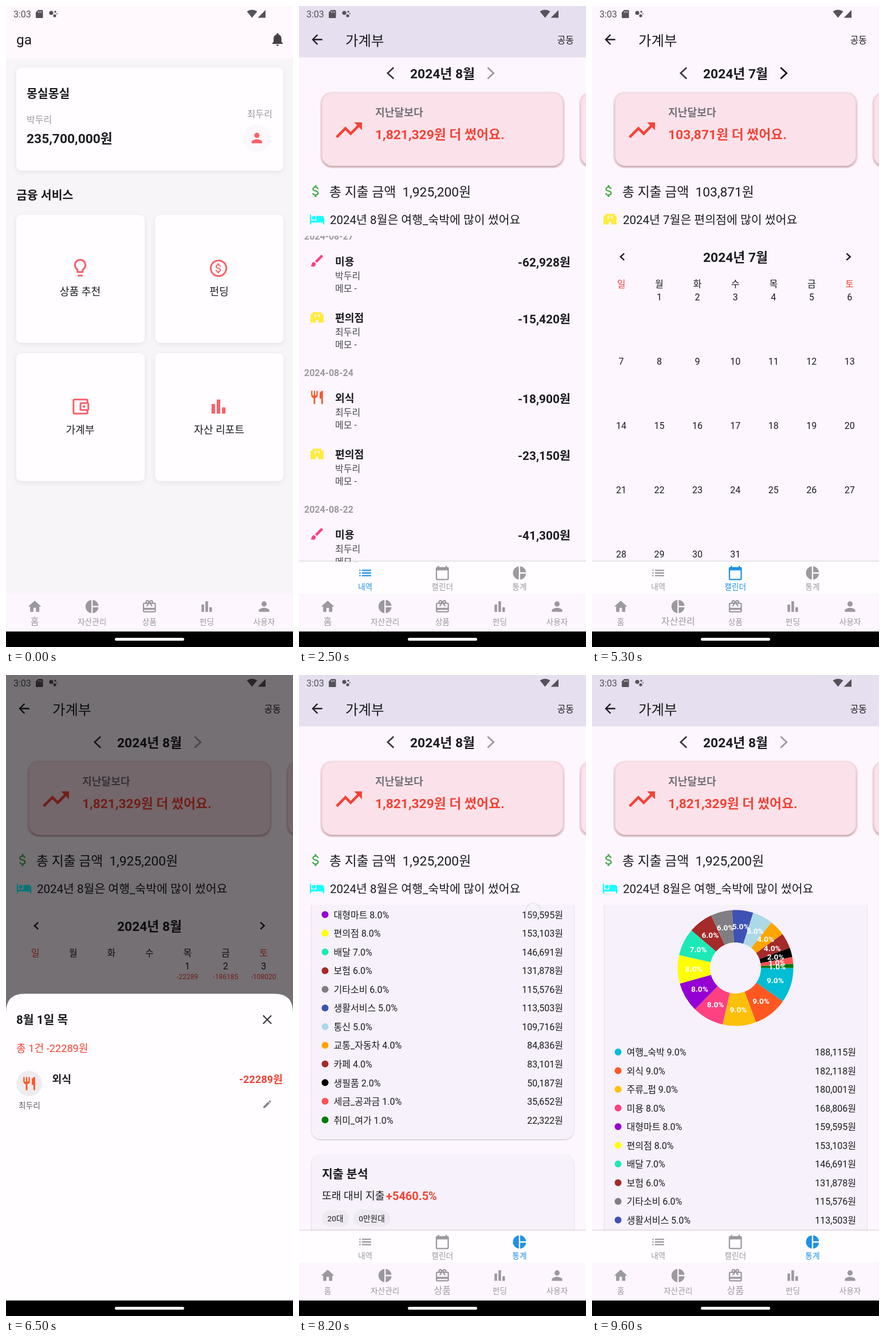
These frames come from a looping animation (501 by 1117 pixels, 9.7 s). An HTML page:

```html
<!DOCTYPE html>
<html lang="ko">
<head>
<meta charset="utf-8">
<title>가계부</title>
<style>
html, body { margin: 0; width: 100%; height: 100%; overflow: hidden; background: #000; }
svg { display: block; width: 501px; height: 1117px; }
text { font-family: Roboto, 'Noto Sans CJK KR', 'Noto Sans CJK', 'Noto Sans', sans-serif; white-space: pre; }
</style>
</head>
<body>
<svg id="stage" viewBox="0 0 501 1117" xmlns="http://www.w3.org/2000/svg"></svg>
<script>
const LOOP = 9700, STEP = 100;
const INK = '#1c1b1f', GREY = '#9c999e', RED = '#f44336', PINK = '#f9616b', BLUE = '#2191e5', SURFACE = '#fdf6fe';
const ANA = '박두리', BEA = '최두리', TEAM = '몽실몽실';

const ICONS = {
  home: 'M10 20v-6h4v6h5v-8h3L12 3 2 12h3v8z',
  pie: 'M11 2v20c-5.07-.5-9-4.79-9-10s3.93-9.5 9-10zm2.03 0v8.99H22c-.47-4.74-4.24-8.52-8.97-8.99zm0 11.01V22c4.74-.47 8.5-4.25 8.97-8.99z',
  gift: 'M20 6h-2.18c.11-.31.18-.65.18-1 0-1.66-1.34-3-3-3-1.05 0-1.96.54-2.5 1.35l-.5.67-.5-.68C10.96 2.54 10.05 2 9 2 7.34 2 6 3.34 6 5c0 .35.07.69.18 1H4c-1.11 0-2 .89-2 2v11c0 1.11.89 2 2 2h16c1.11 0 2-.89 2-2V8c0-1.11-.89-2-2-2zm-5-2a1 1 0 0 1 0 2 1 1 0 0 1 0-2zM9 4a1 1 0 0 1 0 2 1 1 0 0 1 0-2zm11 15H4v-2h16zm0-5H4V8h5.08L7 10.83 8.62 12 12 7.4l3.38 4.6L17 10.83 14.92 8H20z',
  bars: 'M4 9h4v11H4zM10 4h4v16h-4zM16 13h4v7h-4z',
  person: 'M12 12a4 4 0 1 0 0-8 4 4 0 0 0 0 8zm0 2c-2.67 0-8 1.34-8 4v2h16v-2c0-2.66-5.33-4-8-4z',
  bulb: 'M9 21c0 .55.45 1 1 1h4c.55 0 1-.45 1-1v-1H9zm3-19a7 7 0 0 0-4 12.74V17c0 .55.45 1 1 1h6c.55 0 1-.45 1-1v-2.26A7 7 0 0 0 12 2zm2.85 11.1l-.85.6V16h-4v-2.3l-.85-.6A5 5 0 1 1 14.85 13.1z',
  dollar: 'M11.8 10.9c-2.27-.59-3-1.2-3-2.15 0-1.09 1.01-1.85 2.7-1.85 1.78 0 2.44.85 2.5 2.1h2.21c-.07-1.72-1.12-3.3-3.21-3.81V3h-3v2.16c-1.94.42-3.5 1.68-3.5 3.61 0 2.31 1.91 3.46 4.7 4.13 2.5.6 3 1.48 3 2.41 0 .69-.49 1.79-2.7 1.79-2.06 0-2.87-.92-2.98-2.1h-2.2c.12 2.19 1.76 3.42 3.68 3.83V21h3v-2.15c1.95-.37 3.5-1.5 3.5-3.55 0-2.84-2.43-3.81-4.7-4.4z',
  wallet: 'M21 7.28V5a2 2 0 0 0-2-2H5a2 2 0 0 0-2 2v14c0 1.1.9 2 2 2h14a2 2 0 0 0 2-2v-2.28A2 2 0 0 0 22 15V9a2 2 0 0 0-1-1.72zM20 9v6h-7V9zM5 19V5h14v2h-6a2 2 0 0 0-2 2v6c0 1.1.9 2 2 2h6v2zm11-8.5a1.5 1.5 0 0 1 0 3 1.5 1.5 0 0 1 0-3z',
  bell: 'M12 22a2 2 0 0 0 2-2h-4c0 1.1.9 2 2 2zm6-6v-5c0-3.07-1.64-5.64-4.5-6.32V4a1.5 1.5 0 0 0-3 0v.68C7.63 5.36 6 7.92 6 11v5l-2 2v1h16v-1z',
  back: 'M20 11H7.83l5.59-5.59L12 4l-8 8 8 8 1.41-1.41L7.83 13H20z',
  rise: 'M16 6l2.29 2.29-4.88 4.88-4-4L2 16.59 3.41 18l6-6 4 4 6.3-6.29L22 12V6z',
  hotel: 'M7 13a3 3 0 1 0 0-6 3 3 0 0 0 0 6zm12-6h-8v7H3V5H1v15h2v-3h18v3h2v-9a4 4 0 0 0-4-4z',
  food: 'M11 9H9V2H7v7H5V2H3v7c0 2.12 1.66 3.84 3.75 3.97V22h2.5v-9.03C11.34 12.84 13 11.12 13 9V2h-2zm5-3v8h2.5v8H21V2c-2.76 0-5 2.24-5 4z',
  car: 'M18.92 6.01C18.72 5.42 18.16 5 17.5 5h-11c-.66 0-1.21.42-1.42 1.01L3 12v8c0 .55.45 1 1 1h1c.55 0 1-.45 1-1v-1h12v1c0 .55.45 1 1 1h1c.55 0 1-.45 1-1v-8zM6.5 16a1.5 1.5 0 0 1 0-3 1.5 1.5 0 0 1 0 3zm11 0a1.5 1.5 0 0 1 0-3 1.5 1.5 0 0 1 0 3zM5 11l1.5-4.5h11L19 11z',
  brush: 'M7 14c-1.66 0-3 1.34-3 3 0 1.31-1.16 2-2 2 .92 1.22 2.49 2 4 2 2.21 0 4-1.79 4-4 0-1.66-1.34-3-3-3zm13.71-9.37l-1.34-1.34a1 1 0 0 0-1.41 0L9 12.25 11.75 15l8.96-8.96a1 1 0 0 0 0-1.41z',
  store: 'M19 7V4H5v3H2v13h8v-4h4v4h8V7zm-8 3H9v1h2v1H8V9h2V8H8V7h3zm5 2h-1v-2h-2V7h1v2h1V7h1z',
  list: 'M3 13h2v-2H3zm0 4h2v-2H3zm0-8h2V7H3zm4 4h14v-2H7zm0 4h14v-2H7zM7 7v2h14V7z',
  calendar: 'M20 3h-1V1h-2v2H7V1H5v2H4a2 2 0 0 0-2 2v16c0 1.1.9 2 2 2h16a2 2 0 0 0 2-2V5a2 2 0 0 0-2-2zm0 18H4V8h16z',
  warning: 'M1 21h22L12 2zm12-3h-2v-2h2zm0-4h-2v-4h2z',
  close: 'M19 6.41L17.59 5 12 10.59 6.41 5 5 6.41 10.59 12 5 17.59 6.41 19 12 13.41 17.59 19 19 17.59 13.41 12z',
  edit: 'M3 17.25V21h3.75L17.81 9.94l-3.75-3.75zM20.71 7.04a1 1 0 0 0 0-1.41l-2.34-2.34a1 1 0 0 0-1.41 0l-1.83 1.83 3.75 3.75z'
};

const KINDS = {
  외식: ['food', '#f4592c'], 교통_자동차: ['car', '#ffa733'], 미용: ['brush', '#f9418a'], 편의점: ['store', '#ffeb3b']
};
const GROUPS = [
  [421, '2024-08-31', [['외식', ANA, 30000], ['외식', ANA, 30000]]],
  [659, '2024-08-29', [['외식', BEA, 21237], ['교통_자동차', ANA, 27188]]],
  [891, '2024-08-27', [['미용', ANA, 62928], ['편의점', BEA, 15420]]],
  [1129, '2024-08-24', [['외식', BEA, 18900], ['편의점', ANA, 23150]]],
  [1367, '2024-08-22', [['미용', BEA, 41300], ['외식', ANA, 26700]]]
];
const SPEND = [
  ['여행_숙박', 188115, 9, '#00bcd4'], ['외식', 182118, 9, '#ff5722'], ['주류_펍', 180001, 9, '#fcc00a'],
  ['미용', 168806, 8, '#ff4081'], ['대형마트', 159595, 8, '#9400d3'], ['편의점', 153103, 8, '#ffff00'],
  ['배달', 146691, 7, '#1de9b6'], ['보험', 131878, 6, '#a52a2a'], ['기타소비', 115576, 6, '#807e82'],
  ['생활서비스', 113503, 5, '#3f51b5'], ['통신', 109716, 5, '#add8e6'], ['교통_자동차', 84836, 4, '#ffa500'],
  ['카페', 83101, 4, '#a52a2a'], ['생필품', 50187, 2, '#000'], ['세금_공과금', 35652, 1, '#ff5252'], ['취미_여가', 22322, 1, '#007a0a']
];
const TOTAL = SPEND.reduce((sum, s) => sum + s[1], 0);
const DAY_COSTS = { 1: 22289, 2: 186185, 3: 108020, 27: 78348, 29: 48425, 31: 60000 };
const won = n => n.toLocaleString('en-US') + '원';

// y is the visual middle of the line
const text = (x, y, s, size = 16, fill = INK, bold = false, anchor = 'start') =>
  `<text x="${x}" y="${y + size * .36}" font-size="${size}" fill="${fill}" font-weight="${bold ? 700 : 400}" text-anchor="${anchor}">${s}</text>`;
const mid = (x, y, s, size, fill, bold) => text(x, y, s, size, fill, bold, 'middle');
const right = (x, y, s, size, fill, bold) => text(x, y, s, size, fill, bold, 'end');
const rect = (x, y, w, h, fill, r = 0, extra = '') =>
  `<rect x="${x}" y="${y}" width="${w}" height="${h}" rx="${r}" fill="${fill}" ${extra}/>`;
const circle = (x, y, r, fill, extra = '') => `<circle cx="${x}" cy="${y}" r="${r}" fill="${fill}" ${extra}/>`;
const line = (d, stroke, width) => `<path d="${d}" fill="none" stroke="${stroke}" stroke-width="${width}"/>`;
const icon = (name, x, y, fill, size = 27.4) =>
  `<path d="${ICONS[name]}" fill="${fill}" fill-rule="evenodd" transform="translate(${x - size / 2} ${y - size / 2}) scale(${size / 24})"/>`;
const chevron = (x, y, w, h, color, width) => line(`M${x + w} ${y - h}L${x - w} ${y}L${x + w} ${y + h}`, color, width);
const shift = (x, y, body) => `<g transform="translate(${x} ${y})">${body}</g>`;

function track(t, points) {
  if (t <= points[0][0]) return points[0][1];
  for (let i = 1; i < points.length; i++) {
    const [t0, v0] = points[i - 1], [t1, v1] = points[i];
    if (t <= t1) return v0 + (v1 - v0) * (t - t0) / (t1 - t0);
  }
  return points[points.length - 1][1];
}

const DEFS = `<defs>
  <filter id="soft" x="-10%" y="-10%" width="120%" height="120%"><feDropShadow dx="0" dy="2" stdDeviation="4" flood-color="#000" flood-opacity=".08"/></filter>
  <filter id="lift" x="-10%" y="-10%" width="120%" height="125%"><feDropShadow dx="0" dy="2" stdDeviation="1.6" flood-color="#503038" flood-opacity=".4"/></filter>
  <filter id="card" x="-5%" y="-5%" width="110%" height="110%"><feDropShadow dx="0" dy="1" stdDeviation="1.2" flood-color="#000" flood-opacity=".26"/></filter>
  <clipPath id="body"><rect x="0" y="400.5" width="501" height="568"/></clipPath>
  <clipPath id="tile"><rect x="18" y="604" width="224" height="224" rx="9"/></clipPath></defs>`;

function statusBar() {
  const c = '#55525a';
  return text(13, 14, '3:03', 16, c) + `<path d="M56 7H63Q64.500 7 64.500 8.500V19.500Q64.500 21 63 21H53.500Q52 21 52 19.500V11z" fill="${c}"/>`
    + line('M56.500 9v3M59 9v3M61.500 9v3', '#ddd', 1)
    + circle(79, 12, 3.6, c) + circle(86, 10, 1.7, c) + circle(85, 17, 2.6, c) + circle(89, 13.500, 1, c)
    + `<path d="M420.500 9.500Q429.500 3.500 438.500 9.500L429.500 20.500zM453 7V20.500H439.500z" fill="${c}"/>`;
}

function navBar(selected) {
  const items = [['home', '홈'], ['pie', '자산관리'], ['gift', '상품'], ['bars', '펀딩'], ['person', '사용자']];
  return rect(0, 1024, 501, 66, SURFACE) + items.map(([name, label], i) => {
    const x = 50.1 + i * 100.1, on = i === selected;
    return icon(name, x, 1046.5, GREY) + mid(x, on ? 1072 : 1073, label, on ? 16 : 13.7, GREY);
  }).join('');
}

const systemBar = () => rect(0, 1090, 501, 27, '#000') + rect(190, 1101, 121, 5, '#fff', 2.5);

function home(t) {
  const tile = (x, y, label, art) => rect(x, y, 224, 223, '#fffdff', 9, 'filter="url(#soft)"') + art + mid(x + 111.5, y + 133, label, 18.2);
  const ripple = t >= 900 ? `<g clip-path="url(#tile)">${circle(130, 716, (t - 800) * .45, '#000', 'opacity=".06"')}</g>` : '';
  return rect(0, 0, 501, 1117, '#f8f5f9') + rect(0, 0, 501, 92, '#fff8fc')
    + text(18, 58, 'ga', 24.4) + icon('bell', 474, 58, '#444147')
    + rect(18, 107, 466, 180, '#fffdff', 9, 'filter="url(#soft)"')
    + text(36, 153, TEAM, 20.5, INK, true) + text(36, 198, ANA, 16, GREY)
    + text(36, 231, won(235700000), 22.8, INK, true) + right(465, 188, BEA, 16, GREY)
    + circle(438, 230, 24, '#faf8fa') + icon('person', 438, 230, PINK)
    + text(18, 330, '금융 서비스', 20.5, INK, true)
    + tile(18, 364, '상품 추천', icon('bulb', 129.5, 456, PINK, 36.5))
    + tile(260.5, 364, '펀딩', circle(371, 457, 13.6, 'none', `stroke="${PINK}" stroke-width="3"`) + icon('dollar', 371, 457, PINK, 23))
    + tile(18, 605, '가계부', icon('wallet', 130, 698, PINK, 36.5))
    + tile(260.5, 605, '자산 리포트', icon('bars', 371, 698, PINK, 36.5))
    + ripple + navBar(0);
}

function carousel(offset, more) {
  const card = (x, body) => shift(x, 0, rect(37, 149.5, 427, 133, '#f3d7df', 20, 'opacity=".85"')
    + rect(40.5, 152, 420, 126.5, '#fbe2ea', 18, 'filter="url(#lift)"') + body);
  return card(-offset, icon('rise', 87, 216.5, RED, 55) + text(133, 185, '지난달보다', 18.2, '#757078', true)
      + text(133, 224, won(more) + ' 더 썼어요.', 22.8, RED, true))
    + card(452 - offset, icon('warning', 86.5, 217, RED, 56)
      + text(132.5, 203, '절약이 필요할 거 같아요! 오늘은 배우자', 18.2, '#6f656c', true)
      + text(132.5, 230, '와 함께 맛있는 집밥을 만들어 먹어봐요.', 18.2, '#6f656c', true));
}

function entries() {
  return GROUPS.map(([y, date, items]) => text(9, y, date, 16, GREY, true) + items.map(([kind, who, cost], i) => {
    const [name, color] = KINDS[kind], top = y + 44 + i * 98.7, drop = name === 'car' ? 1.5 : 0;
    return icon(name, 31.5, top - 1, color) + text(63, top, kind, 18.2, INK, true)
      + text(63, top + 25 + drop, who, 16, '#49454f') + text(63, top + 47 + drop, '메모 -', 16, '#49454f')
      + right(474, top + 1.5, '-' + won(cost), 20.8, INK, true);
  }).join('')).join('');
}

function calendar(july) {
  const column = c => 51 + c * 66.45;
  let out = chevron(53, 437, 3.2, 5.8, INK, 2.4) + chevron(447.5, 437, -3.2, 5.8, INK, 2.4)
    + mid(250.5, 438, `2024년 ${july ? 7 : 8}월`, 22.8, INK, true);
  [...'일월화수목금토'].forEach((d, c) => out += mid(column(c), 484, d, 16, c % 6 ? INK : RED));
  for (let day = 1, first = july ? 1 : 4; day <= 31; day++) {
    const cell = day - 1 + first, x = column(cell % 7), y = 507 + Math.floor(cell / 7) * 112;
    out += mid(x, y, day, 16);
    if (!july && DAY_COSTS[day]) out += mid(x, y + 19, '-' + DAY_COSTS[day], 12, RED);
  }
  return out;
}

function donut(cx, cy) {
  const outer = 101, inner = 44.5, middle = (outer + inner) / 2;
  let angle = 0, slices = '', labels = '';
  const at = (r, a) => `${cx + r * Math.cos(a)} ${cy + r * Math.sin(a)}`;
  for (const [, value, percent, color] of SPEND) {
    const end = angle + value / TOTAL * Math.PI * 2, half = (angle + end) / 2;
    slices += `<path d="M${at(outer, angle)}A${outer} ${outer} 0 0 1 ${at(outer, end)}L${at(inner, end)}A${inner} ${inner} 0 0 0 ${at(inner, angle)}z" fill="${color}"/>`;
    labels += mid(cx + middle * Math.cos(half), cy + middle * Math.sin(half), percent.toFixed(1) + '%', 13.7, '#fff', true);
    angle = end;
  }
  return slices + labels;
}

function stats() {
  const panel = (y, h) => rect(22, y, 457.5, h, '#f6f1fa', 16, 'filter="url(#card)"');
  const rows = SPEND.map(([name, value, percent, color], i) => {
    const y = 697 + i * 32.52;
    return circle(45.5, y, 6, color) + text(60.5, y + .5, `${name} ${percent.toFixed(1)}%`) + right(461, y + .5, won(value));
  }).join('');
  return panel(414, 804.5) + donut(250.5, 550.5) + rows + panel(1244.5, 320)
    + text(40, 1279, '지출 분석', 20.5, INK, true) + text(40, 1317, '또래 대비 지출', 18.2)
    + text(152, 1317, '+5460.5%', 20, RED, true)
    + rect(40, 1342, 47, 29, '#eeeaf1', 14.5) + mid(63.5, 1356.5, '20대', 13.7)
    + rect(95.5, 1342, 63.5, 29, '#eeeaf1', 14.5) + mid(127, 1356.5, '0만원대', 13.7);
}

function tabBar(tab) {
  return rect(0, 966, 501, 4, '#000', 0, 'opacity=".07"') + rect(0, 968.5, 501, 55.5, '#fffdff')
    + [['list', '내역'], ['calendar', '캘린더'], ['pie', '통계']].map(([name, label], i) => {
      const x = 115.5 + i * 134.7, color = i === tab ? BLUE : GREY;
      return icon(name, x, 988, color) + mid(x, 1012, label, 13.7, color);
    }).join('');
}

const listScroll = t => track(t, [[1400, 0], [1500, 4], [1600, 14.5], [1700, 90], [1900, 300], [2100, 430], [2400, 500],
  [2500, 490], [2700, 320], [2900, 130], [3100, 30], [3300, 0]]);
const statScroll = t => track(t, [[7900, 0], [8000, 90], [8200, 409.5], [8300, 455], [8400, 475], [8600, 460], [8900, 220], [9100, 90], [9400, 40]]);
const cardOffset = t => track(t, [[3400, 0], [3500, 110], [3600, 330], [3700, 423], [3800, 446], [3900, 452], [4000, 390], [4100, 160], [4200, 30], [4300, 0]]);

function ledger(t) {
  const tab = t < 4300 ? 0 : t < 7600 ? 1 : 2;
  const july = t >= 5000 && t < 5700;
  const scroll = [listScroll(t), 0, statScroll(t)][tab];
  const content = tab === 0 ? entries() : tab === 1 ? calendar(july) : stats();
  return rect(0, 0, 501, 1117, SURFACE) + (scroll > 0 ? rect(0, 0, 501, 89.5, '#e6dfef') : '')
    + icon('back', 31.5, 58.5, INK) + text(81, 60, '가계부', 24.4) + right(480, 59.5, '공동', 15.9)
    + chevron(160, 117, 5.2, 9.8, '#3c393f', 2.8) + chevron(334.5, 117, -5.2, 9.8, july ? '#111' : GREY, 2.8)
    + mid(250.5, 118, `2024년 ${july ? 7 : 8}월`, 22.8, INK, true)
    + carousel(cardOffset(t), july ? 103871 : 1821329)
    + icon('dollar', 29.5, 322.5, '#4caf50') + text(53, 324, '총 지출 금액  ' + won(july ? 103871 : TOTAL), 22.8)
    + icon(july ? 'store' : 'hotel', 31.5, 371.5, july ? '#ffeb3b' : '#18ffff')
    + text(54, 372.5, july ? '2024년 7월은 편의점에 많이 썼어요' : '2024년 8월은 여행_숙박에 많이 썼어요', 20.5)
    + `<g clip-path="url(#body)">${shift(0, -scroll, content)}</g>` + tabBar(tab) + navBar(tab);
}

function sheet(t) {
  const closing = track(t, [[7000, 0], [7100, .25], [7200, .75], [7300, 1]]);
  return rect(0, 0, 501, 1090, '#000', 0, `opacity="${.54 * (1 - closing)}"`) + shift(0, closing * 535,
    '<path d="M0 1090V588Q0 555.500 32 555.500H469Q501 555.500 501 588V1090z" fill="#fffdff"/>'
    + text(18, 601, '8월 1일 목', 20.5, INK, true) + icon('close', 456, 600.5, '#3c393f')
    + text(18, 650, '총 1건 -22289원', 18.2, RED)
    + circle(40.5, 712, 22.3, '#eeecee') + icon('food', 40.5, 712, '#ff5722')
    + text(80.5, 704, '외식', 18.2, INK, true) + right(483, 704, '-22289원', 18.2, RED, true)
    + text(22, 750, BEA, 13.7, '#5c595e') + icon('edit', 456, 748, '#8c898e', 18.2));
}

const TAPS = [[900, 130, 716], [4200, 250, 990], [4800, 160, 117], [5500, 334, 117], [6300, 316, 506], [7000, 456, 600], [7500, 385, 990]];

function touch(t) {
  const ring = (x, y, a) => circle(x, y, 12.5, '#fff', `fill-opacity=".4" stroke="#bdb5c6" stroke-width="2" opacity="${a}"`);
  if (t >= 1500 && t <= 1800) return ring(242, 711.5 - listScroll(t), 1);
  if (t >= 8000 && t <= 8200) return ring(409, 819.5 - statScroll(t), t < 8200 ? 1 : .25);
  const tap = TAPS.find(([start]) => t === start);
  return tap ? ring(tap[1], tap[2], .8) : '';
}

function scene(t) {
  const enter = track(t, [[1000, 0], [1100, .4], [1200, .85], [1300, 1]]);
  let out = DEFS;
  if (enter < 1) out += home(t);
  if (enter > 0) {
    const scale = .88 + .12 * enter;
    out += enter < 1
      ? `<g opacity="${enter}" transform="translate(250.5 545) scale(${scale}) translate(-250.5 -545)">${ledger(t)}</g>`
      : ledger(t);
  }
  out += statusBar();
  if (t >= 6500 && t < 7300) out += sheet(t);
  return out + systemBar() + touch(t);
}

const stage = document.getElementById('stage');
const start = performance.now();
let shown = -1;
function tick() {
  const t = Math.floor((performance.now() - start) % LOOP / STEP) * STEP;
  if (t !== shown) stage.innerHTML = scene(shown = t);
  requestAnimationFrame(tick);
}
tick();
</script>
</body>
</html>
```
